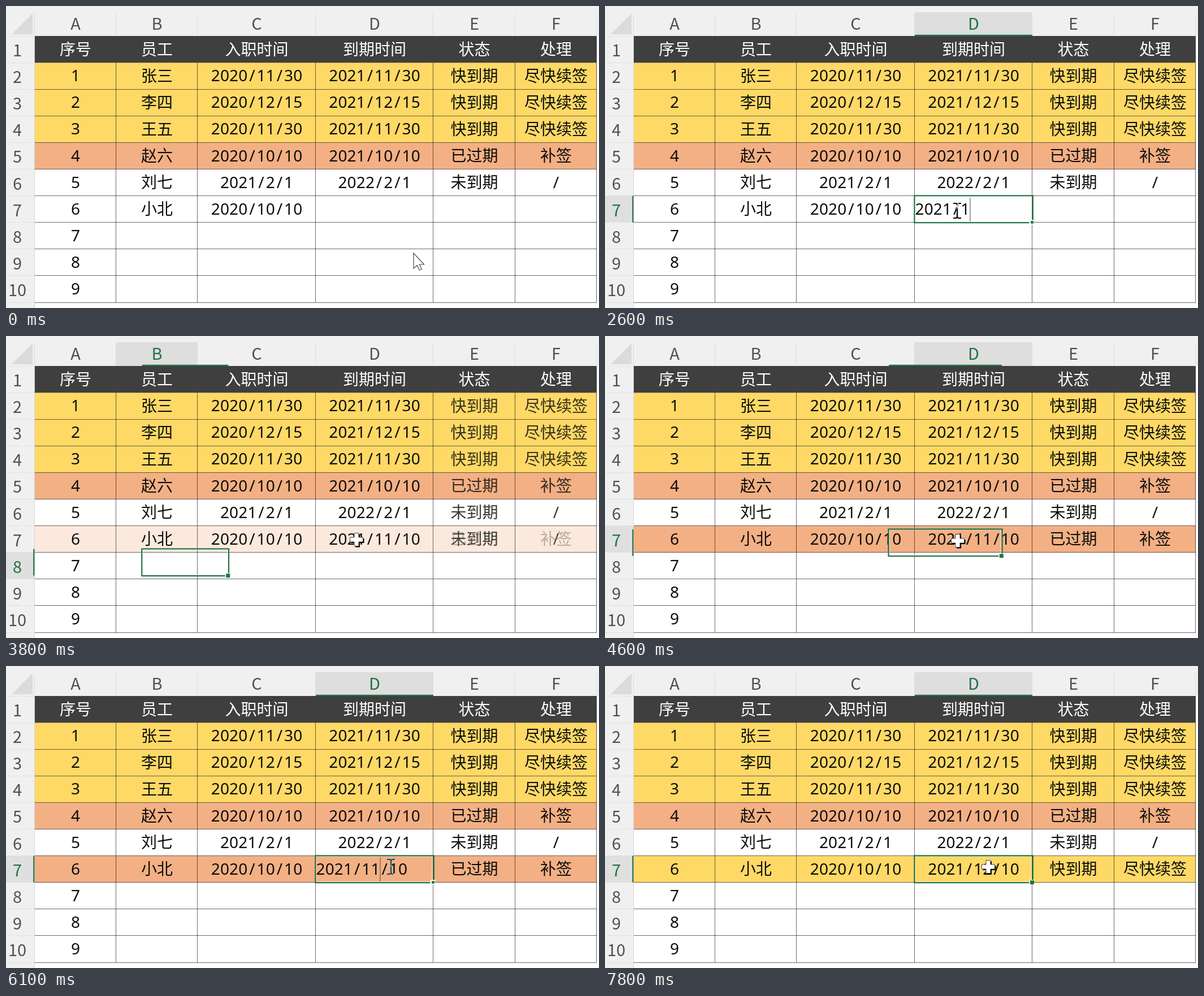
Write an HTML page that moves like this. It is 1049 px wide and 534 px high and loops after 8 s.

```html
<!DOCTYPE html>
<html lang="zh-CN">
<head>
<meta charset="utf-8">
<style>
html, body { margin: 0; width: 100%; height: 100%; overflow: hidden; background: #fff; }
svg { display: block; width: 1049px; height: 534px; isolation: isolate; }
text { text-anchor: middle; }
.head { font: 29px "Noto Sans CJK SC", "Noto Sans CJK JP", sans-serif; }
.cjk { font: 28px "Noto Sans CJK SC", "Noto Sans CJK JP", sans-serif; }
.num { font: 28px "Noto Sans", "Open Sans", sans-serif; }
.beam { mix-blend-mode: difference; fill: none; stroke: #fff; stroke-width: 2.2; }
</style>
</head>
<body>
<svg id="stage" viewBox="0 0 1049 534"></svg>
<script>
const stage = document.getElementById('stage');
const LOOP = 8000, TICK = 100, PITCH = 16.15;
const GREEN = '#217346', YELLOW = '#ffd966', ORANGE = '#f3b084', WHITE = '#ffffff';
const cols = [51, 195, 339, 548, 756, 901, 1045];
const rowY = i => 53 + 47.1 * i;
const midX = c => (cols[c] + cols[c + 1]) / 2;
const midY = r => rowY(r) + 23.5;
const mix = (a, b, p) => a + (b - a) * p;

const titles = ['序号', '员工', '入职时间', '到期时间', '状态', '处理'];
const people = [
  ['张三', '2020/11/30', '2021/11/30'],
  ['李四', '2020/12/15', '2021/12/15'],
  ['王五', '2020/11/30', '2021/11/30'],
  ['赵六', '2020/10/10', '2021/10/10'],
  ['刘七', '2021/2/1', '2022/2/1'],
  ['小北', '2020/10/10', '']
];
const status = {
  none: ['', '', WHITE],
  soon: ['快到期', '尽快续签', YELLOW],
  late: ['已过期', '补签', ORANGE],
  open: ['未到期', '/', WHITE]
};
const fixedStatus = ['soon', 'soon', 'soon', 'late', 'open'];

const rect = (x, y, w, h, fill, extra = '') =>
  `<rect x="${x}" y="${y}" width="${w}" height="${h}" fill="${fill}" ${extra}/>`;
const line = (x1, y1, x2, y2, color, w = 1) =>
  `<path d="M${x1} ${y1}L${x2} ${y2}" stroke="${color}" stroke-width="${w}"/>`;
const label = (s, x, y, cls, fill) =>
  `<text x="${x}" y="${y}" class="${cls}" fill="${fill}">${s}</text>`;

// Digits and slashes sit on an even pitch.
function digits(s, left, base) {
  const xs = [...s].map((_, i) => (left + (i + 0.5) * PITCH).toFixed(2));
  return label(s, xs.join(' '), base, 'num', '#0c0c0c');
}

function cell(s, c, r, fill = '#0c0c0c') {
  if (!s) return '';
  const x = midX(c), base = midY(r) + 9.6;
  if (/^[\d/]+$/.test(s)) return digits(s, x - s.length * PITCH / 2, base);
  return label(s, x, base + 0.4, 'cjk', fill);
}

// Latest entry of a [time, ...values] list at time t.
const latest = (list, t) => list.filter(e => e[0] <= t).pop();

const statusSteps = [
  [0, 'none', 'none', 1], [3700, 'open', 'open', 1], [3800, 'open', 'late', 0.28],
  [3900, 'late', 'late', 1], [7000, 'late', 'soon', 0.28], [7100, 'soon', 'soon', 1]
];

// Text of the edited cell: time, text, caret index (-1 hides it).
const D = '2021/11/10';
const edits = [
  [0, null], [1100, '2', 1], [1300, '20', 2], [1500, '202', 3], [1600, '2021', 4],
  [2000, '2021/', 5], [2600, '2021/1', 6], [2700, '2021/11', 7], [2900, '2021/11/', 8],
  [3200, '2021/11/1', 9], [3400, D, 10], [3700, null],
  [4800, D, 5], [5300, D, -1], [5700, D, 8], [5800, D, -1], [6100, D, 7],
  [6500, '2021/1/10', 6], [6700, '2021/12/10', 7], [7000, null]
];

// Selected cell: time, column, row; each move glides for one tick.
const picks = [[400, 3, 6], [3800, 1, 7], [4600, 3, 6], [7000, 3, 7], [7700, 3, 6]];

const pointer = [
  [0, 721, 437], [100, 700, 421], [200, 648, 382], [300, 623, 362],
  [3700, 620, 360], [4300, 624, 362], [4900, 624, 362], [5400, 682, 357],
  [5500, 688, 361], [5700, 681, 355], [7000, 678, 355]
];

function pointerAt(t) {
  const i = pointer.findLastIndex(p => p[0] <= t);
  const [t0, x, y] = pointer[i];
  if (t0 !== 4900) return [x, y];
  const [t1, x1, y1] = pointer[i + 1];
  const k = (t - t0) / (t1 - t0), p = k * k * (3 - 2 * k);
  return [mix(x, x1, p), mix(y, y1, p)];
}

function selection(t) {
  const i = picks.findLastIndex(p => p[0] <= t);
  if (i < 0) return null;
  const box = ([, c, r]) => [cols[c], rowY(r), cols[c + 1], rowY(r + 1)];
  const [start, c, r] = picks[i], to = box(picks[i]);
  const from = i ? box(picks[i - 1]) : to;
  const p = t - start < TICK ? 0.87 : 1;
  return { c, r, box: to.map((v, k) => mix(from[k], v, p)) };
}

function blend(a, b, p) {
  const part = (h, k) => parseInt(h.slice(k, k + 2), 16);
  return `rgb(${[1, 3, 5].map(k => Math.round(mix(part(a, k), part(b, k), p)))})`;
}

function headers(sel) {
  let s = rect(0, 0, 1049, 53, '#f0f0f0') + rect(0, 53, 51, 481, '#f0f0f0');
  s += '<path d="M47 13V50H10Z" fill="#dbdbdb"/>';
  if (sel) {
    s += rect(cols[sel.c], 11, cols[sel.c + 1] - cols[sel.c], 42, '#dedede');
    s += rect(0, rowY(sel.r), 50, 47, '#dfdfdf');
  }
  cols.forEach(x => s += line(x - 0.5, 13, x - 0.5, 52, '#dcdcdc'));
  for (let r = 0; r <= 10; r++) {
    const y = Math.floor(rowY(r)) + 0.5;
    s += line(0, y, 50, y, '#e2e2e2');
  }
  s += line(50.5, 53, 50.5, 534, '#d4d4d4');
  [...'ABCDEF'].forEach((ch, c) =>
    s += label(ch, midX(c), 41.5, 'head', sel && sel.c === c ? GREEN : '#505050'));
  for (let r = 0; r < 10; r++)
    s += label(r + 1, 20, midY(r) + 12.5, 'head', sel && sel.r === r ? GREEN : '#505050');
  return s;
}

function statusLayer(last, opacity) {
  const rows = [...fixedStatus, last];
  const s = rows.map((k, i) => cell(status[k][0], 4, i + 1) + cell(status[k][1], 5, i + 1));
  return `<g opacity="${opacity}">${s.join('')}</g>`;
}

function table(t, editing) {
  const [, was, now, p] = latest(statusSteps, t);
  const fills = fixedStatus.map(k => status[k][2]);
  fills.push(blend(status[was][2], status[now][2], p));
  let s = fills.map((f, i) => rect(51, rowY(i + 1), 994, 47.1, f)).join('');
  for (let r = 2; r <= 10; r++) {
    const y = Math.floor(rowY(r)) + 0.5;
    s += line(51, y, 1045, y, 'rgba(0,0,0,.58)');
  }
  cols.forEach((x, i) => {
    if (i) s += line(x - 0.5, 100, x - 0.5, 524, 'rgba(0,0,0,.58)');
  });
  s += rect(51, 53, 994, 47.3, '#3f3f3f');
  titles.forEach((h, c) => s += cell(h, c, 0, '#fff'));
  for (let r = 1; r <= 9; r++) s += cell(String(r), 0, r);
  people.forEach((row, i) => row.forEach((v, c) => s += cell(v, c + 1, i + 1)));
  if (!editing && t >= 3700) s += cell(t < 7000 ? D : '2021/12/10', 3, 6);
  if (was !== now) s += statusLayer(was, 1 - p);
  return s + statusLayer(now, p);
}

function frameBox({ box: [x0, y0, x1, y1] }, editing) {
  const w = x1 - x0, h = y1 - y0;
  let s = rect(x0 + 1.2, y0 + 1.2, w - 3, h - 2.6, 'none', 'stroke="#fff" stroke-opacity=".75"');
  s += rect(x0 - 0.6, y0 - 0.2, w + 1.4, h + 0.6, 'none', `stroke="${GREEN}" stroke-width="2.2"`);
  s += rect(x1 - 5.5, y1 - 4.5, 8.5, 8.5, '#fff');
  s += editing
    ? rect(x1 - 3, y1 - 2.5, 5, 4.5, GREEN)
    : rect(x1 - 4, y1 - 3.5, 7, 7, GREEN);
  s += line(x0, 51.8, x1, 51.8, GREEN, 2.2);
  return s + line(49.3, y0, 49.3, y1, GREEN, 2.2);
}

function cursor(t, editing) {
  const [x, y] = pointerAt(t);
  const at = `transform="translate(${x} ${y})"`;
  if (t < 400)
    return `<path ${at} d="M0 0V27L6.2 21.5L10.3 30L14.3 28.3L10.5 20H18.5Z" fill="#fff" stroke="#4a4a4a" stroke-width="1.2"/>`;
  if (editing)
    return `<path ${at} class="beam" d="M-7 -13H-3Q0 -13 0 -10Q0 -13 3 -13H7M0 -10V10M-7 13H-3Q0 13 0 10Q0 13 3 13H7"/>`;
  const plus = 'M-4 -11.5H4V-4H11.5V4H4V11.5H-4V4H-11.5V-4H-4Z';
  return `<g ${at}><path d="${plus}" transform="translate(2 2)" fill="#000"/>` +
    `<path d="${plus}" fill="#fff" stroke="#333" stroke-width=".9"/></g>`;
}

function render(t) {
  const sel = selection(t), [, text, caret] = latest(edits, t);
  const editing = text !== null;
  let s = rect(0, 0, 1049, 534, '#fff') + headers(sel) + table(t, editing);
  if (sel) s += frameBox(sel, editing);
  if (editing) {
    s += digits(text, 548.5, midY(6) + 9.6);
    if (caret >= 0) {
      const x = 549 + caret * PITCH;
      s += line(x, 339, x, 381, '#555', 1.1);
    }
  }
  stage.innerHTML = s + cursor(t, editing);
}

let shown = -1;
function loop() {
  const t = Math.floor(performance.now() % LOOP / TICK) * TICK;
  if (t !== shown) render(shown = t);
  requestAnimationFrame(loop);
}
loop();
</script>
</body>
</html>
```
